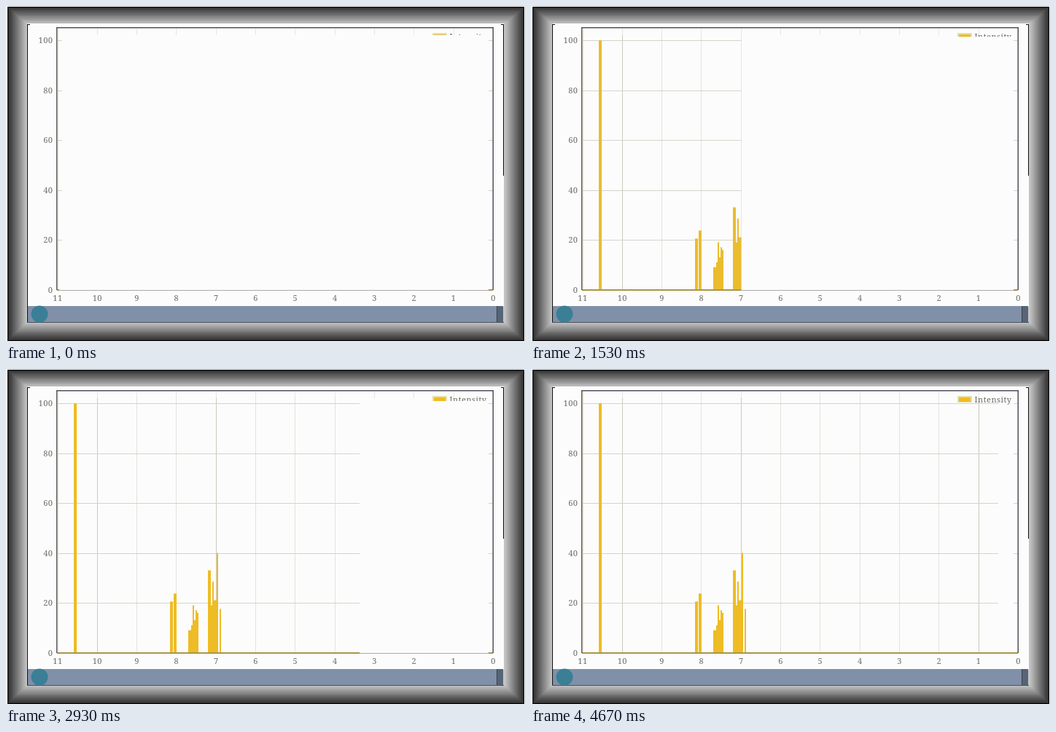
Animation of 712 by 460 pixels, one loop 5.07 s. Source, as an HTML page with a canvas:

```html
<!DOCTYPE html>
<html lang="en">
<head>
<meta charset="utf-8">
<title>Intensity chart</title>
<style>
  html, body { margin: 0; width: 100%; height: 100%; overflow: hidden; background: #fff; }
  canvas { display: block; }
</style>
</head>
<body>
<canvas id="stage" width="712" height="460"></canvas>
<script>
const ctx = document.getElementById('stage').getContext('2d');
const LOOP = 5070, LAST_STEP = 70;
const LEFT = 70, TOP = 29, RIGHT = 668, BASE = 389.5;
const PAPER = '#fcfcfc', INK = '#6c6c66', FRAME = '#50505c', GRID = '#d4d4cc';
const COLUMN = 2;
const xOf = shift => RIGHT - shift * 54.32;
const yOf = intensity => BASE - intensity * 3.425;

// Each peak starts at a chemical shift and runs right in equal columns.
const PEAKS = [
  { shift: 10.59, heights: [100, 100] },
  { shift: 8.16, heights: [20.5, 20.5] },
  { shift: 8.07, heights: [23.7, 23.7] },
  { shift: 7.7, heights: [9, 9, 11, 19, 13, 17, 16] },
  { shift: 7.2, heights: [33, 33, 19, 28.5, 21, 21, 40, 0, 17.5] }
];

const mix = (a, b, p) => a + (b - a) * p;

function rect(color, x, y, w, h) {
  ctx.fillStyle = color;
  ctx.fillRect(x, y, w, h);
}

function clipped(x, y, w, h, draw) {
  ctx.save();
  ctx.beginPath();
  ctx.rect(x, y, w, h);
  ctx.clip();
  draw();
  ctx.restore();
}

function label(text, x, y, align) {
  ctx.font = '11px "Noto Serif", serif';
  ctx.letterSpacing = '0.5px';
  ctx.fillStyle = INK;
  ctx.textAlign = align;
  ctx.fillText(text, x, y);
}

function drawBezel() {
  const rings = 27;
  rect('#fff', 0, 0, 712, 460);
  for (let i = 0; i < rings; i++) {
    const p = i / (rings - 1);
    const gray = i ? mix(44, 196, p) : 0;
    const x = 2 + i, y = Math.round(mix(1, 24, p));
    rect(`rgb(${gray},${gray},${gray})`, x, y, 711 - i - x, Math.round(mix(460, 435, p)) - y);
  }
}

function drawScreen() {
  rect(PAPER, 30, 24, 653, 389);
  rect('#111', 29, 25, 1, 410);
  rect('#111', 682, 25, 1, 208);
  rect('#111', 29, 25, 4, 1);
  rect('#111', 679, 25, 4, 1);
  rect('#8090a8', 30, 412, 643, 22);
  rect('#566476', 673, 412, 9, 22);
  rect('#39434f', 673, 412, 1, 22);
  rect('#4c525a', 29, 434, 654, 1);
  ctx.fillStyle = '#3a7f96';
  ctx.beginPath();
  ctx.arc(46, 423, 11.5, 0, Math.PI * 2);
  ctx.fill();
}

function drawLabels() {
  for (let v = 0; v <= 100; v += 20) label(v, 64.5, yOf(v) + 4, 'right');
  for (let v = 0; v <= 11; v++) label(v, xOf(v) + 0.5, 404.5, 'center');
}

function drawTicks() {
  for (let v = 1; v <= 10; v++) rect('#e6e6de', Math.round(xOf(v)), 31, 1, 9);
  for (let v = 20; v <= 100; v += 20) {
    const y = Math.round(yOf(v));
    rect(GRID, 71, y, 6, 1);
    rect(GRID, 662, y, 6, 1);
  }
}

function drawGrid() {
  for (let v = 1; v <= 10; v++) {
    const strong = v % 3 === 1 && v !== 4;
    rect(strong ? '#cacac0' : '#e2e2dc', Math.round(xOf(v)), 40, 1, 349);
  }
  for (let v = 20; v <= 100; v += 20) rect(GRID, 71, Math.round(yOf(v)), 570, 1);
}

function drawPeaks(color) {
  for (const { shift, heights } of PEAKS) {
    const x = Math.round(xOf(shift));
    heights.forEach((h, i) => rect(color, x + i * COLUMN, yOf(h), COLUMN, BASE - yOf(h)));
  }
}

function drawPlot(t, gold) {
  const edge = Math.min(RIGHT, 73 + 0.1405 * t);
  const axis = '#a8964a';
  drawTicks();
  rect('#aaaaaa', LEFT, 390, RIGHT - LEFT, 1);
  clipped(LEFT, TOP, edge - LEFT, 362, () => {
    drawGrid();
    drawPeaks(gold);
    rect(axis, LEFT, 389, RIGHT - LEFT, 2);
  });
  rect(axis, 662, 389, 6, 2);
  rect(FRAME, 69, TOP, 600, 1.5);
  rect(FRAME, 69, TOP, 1.5, 361);
  rect(FRAME, 667.5, TOP, 1.5, 361);
  rect('#cfc7a0', 70.5, 31, 1, 358);
}

function drawLegend(t, gold) {
  const bottom = t >= 4600 ? 51 : 40 + 0.0014 * t;
  clipped(580, 34, 84, bottom - 34, () => {
    rect('#e6dfa8', 585, 37, 20, 9);
    rect(gold, 587, 39, 16, 6);
    label('Intensity', 608.5, 46, 'left');
  });
}

// Steps alternate 70, 60, 70 ms in every 200 ms.
function stepTime(ms) {
  const part = ms % 200;
  const step = Math.floor(ms / 200) * 3 + (part >= 130 ? 2 : part >= 70 ? 1 : 0);
  return Math.min(step, LAST_STEP) * 200 / 3;
}

function render(now) {
  const t = stepTime(now % LOOP);
  const p = Math.min(1, t / 2000);
  const gold = `rgb(${mix(222, 238, p)},${mix(186, 188, p)},${mix(80, 36, p)})`;
  drawBezel();
  drawScreen();
  drawLabels();
  drawPlot(t, gold);
  drawLegend(t, gold);
}

const start = performance.now();
function loop() {
  render(performance.now() - start);
  requestAnimationFrame(loop);
}
loop();
</script>
</body>
</html>
```
